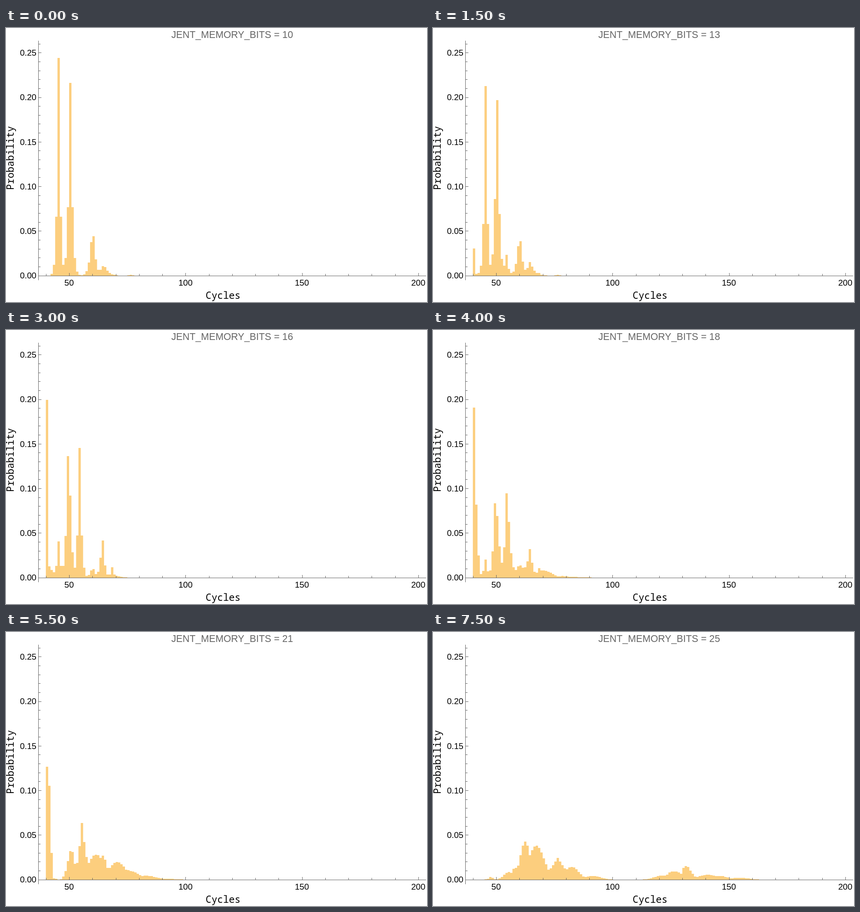
These frames come from a looping animation (927x604 px, 8000 ms). An HTML page:

```html
<!DOCTYPE html>
<html lang="en">
<head>
<meta charset="utf-8">
<title>Cycle histogram</title>
<style>
  html, body { margin: 0; width: 100%; height: 100%; overflow: hidden; background: #fff; }
  svg { display: block; width: 927px; height: 604px; }
  text { text-anchor: middle; font-family: "Liberation Sans", Arial, sans-serif; }
  #title { font-size: 21.33px; fill: #666; }
  #labels text { font-size: 18.67px; fill: #000; }
  #labels .y { text-anchor: end; }
  .name { font: 21.33px "Noto Sans Mono", monospace; fill: #000; }
  #bars { fill: #fcce7e; }
  #axes { fill: #666; shape-rendering: crispEdges; }
</style>
</head>
<body>
<svg viewBox="0 0 927 604">
  <path id="bars"/>
  <path id="axes"/>
  <g id="labels"></g>
  <text id="title" x="498" y="22"></text>
  <text class="name" x="478" y="597">Cycles</text>
  <text class="name" transform="translate(16.5 286.5) rotate(-90)">Probability</text>
</svg>
<script>
const BASE = 546, UNIT = 1965, FIRST = 10, LAST = 25, STEP = 500;
const $ = id => document.getElementById(id);
const xOf = cycles => 139 + (cycles - 50) * 5.125;
const yOf = p => BASE - p * UNIT;
const rect = (x, y, w, h) => `M${x} ${y}h${w}v${h}h${-w}z`;

// A peak gives its height in pixels at c; higher powers have flatter tops and steeper sides.
const peak = (mid, height, width, power) =>
  c => height * Math.exp(-((Math.abs(c - mid) / width) ** power));
const spike = (mid, height, width) => peak(mid, height, width, 1.2);
const hill = (mid, height, width) => peak(mid, height, width, 2);
const block = (mid, height, width) => peak(mid, height, width, 3);
const profile = (...peaks) => c => Math.max(...peaks.map(p => p(c)));

// Key profiles by memory size; ease shapes the blend that leads to each.
const keys = [
  { bits: 10, ease: 1, at: profile(
    spike(45, 480, 0.8), spike(50, 425, 0.97), spike(59.6, 112, 1.25),
    spike(64.4, 24, 2), spike(76, 2, 1.2)) },
  { bits: 16, ease: 2.7, at: profile(
    spike(40, 392, 0.43), spike(41, 22, 3), spike(45, 80, 0.92),
    spike(49.3, 335, 1.05), spike(54, 286, 0.91), spike(59.6, 25, 1.2),
    spike(63.8, 95, 1), spike(68, 23, 0.9), spike(68, 9, 2.7)) },
  { bits: 20, ease: 1, at: profile(
    block(40, 358, 1.75), hill(43.5, 4, 1), hill(50.3, 92, 2), spike(55, 153, 1.6),
    hill(60.5, 36, 5), spike(64.4, 52, 1.6), hill(70.5, 28, 4.3), spike(78, 7, 7)) },
  { bits: 23, ease: 1, at: profile(
    block(40, 30, 2.3), spike(47.5, 12, 1), hill(51.3, 21, 1.3), hill(56, 76, 3),
    hill(61.5, 96, 4.8), hill(69.8, 61, 6), hill(75.8, 45, 4.5),
    hill(83.5, 19, 5), hill(92, 5, 5)) },
  { bits: 25, ease: 1.4, at: profile(
    spike(47.3, 8, 1), hill(55, 17, 3), hill(57.6, 28, 1.5), hill(62, 84, 3),
    hill(66.8, 75, 4.7), spike(76, 48, 4.2), hill(82, 28, 4.3), hill(91, 8, 5),
    hill(121, 9, 5), block(126, 18, 3.8), block(131.1, 30, 2.2), spike(133, 20, 2),
    hill(140.5, 11, 6), hill(146, 8, 4), hill(154, 4, 6)) },
];

function heightAt(bits, c) {
  const i = Math.max(1, keys.findIndex(k => k.bits >= bits));
  const from = keys[i - 1], to = keys[i];
  const t = ((bits - from.bits) / (to.bits - from.bits)) ** to.ease;
  return from.at(c) * (1 - t) + to.at(c) * t;
}

// One staircase outline, so neighbouring bars meet without seams.
function barPath(bits) {
  let d = `M${xOf(40)} ${BASE}`;
  for (let c = 40; c <= 165; c++) {
    d += `V${BASE - Math.round(heightAt(bits, c))}H${xOf(c + 1)}`;
  }
  return d + `V${BASE}z`;
}

function label(text, x, y, cls) {
  const el = document.createElementNS("http://www.w3.org/2000/svg", "text");
  el.textContent = text;
  el.setAttribute("x", x);
  el.setAttribute("y", y);
  el.setAttribute("class", cls);
  $("labels").append(el);
}

function drawAxes() {
  let d = rect(71, 28, 1, 528) + rect(71, BASE, 854, 1);
  for (let c = 40; c <= 200; c += 10) {
    const major = c % 50 === 0, len = major ? 6 : 4;
    d += rect(Math.round(xOf(c)), BASE - len, 1, len);
    if (major) label(c, xOf(c), 568, "x");
  }
  for (let i = 0; i <= 26; i++) {
    const major = i % 5 === 0, y = yOf(i / 100);
    d += rect(71, Math.floor(y), major ? 7 : 5, 1);
    if (major) label((i / 100).toFixed(2), 67, y + 6.3, "y");
  }
  $("axes").setAttribute("d", d);
}

drawAxes();
const count = LAST - FIRST + 1;
const paths = Array.from({ length: count }, (_, i) => barPath(FIRST + i));
let shown = -1;

function show(i) {
  if (i === shown) return;
  shown = i;
  $("bars").setAttribute("d", paths[i]);
  $("title").textContent = `JENT_MEMORY_BITS = ${FIRST + i}`;
}

const start = performance.now();
function tick() {
  show(Math.floor((performance.now() - start) / STEP) % count);
  requestAnimationFrame(tick);
}
tick();
</script>
</body>
</html>
```
